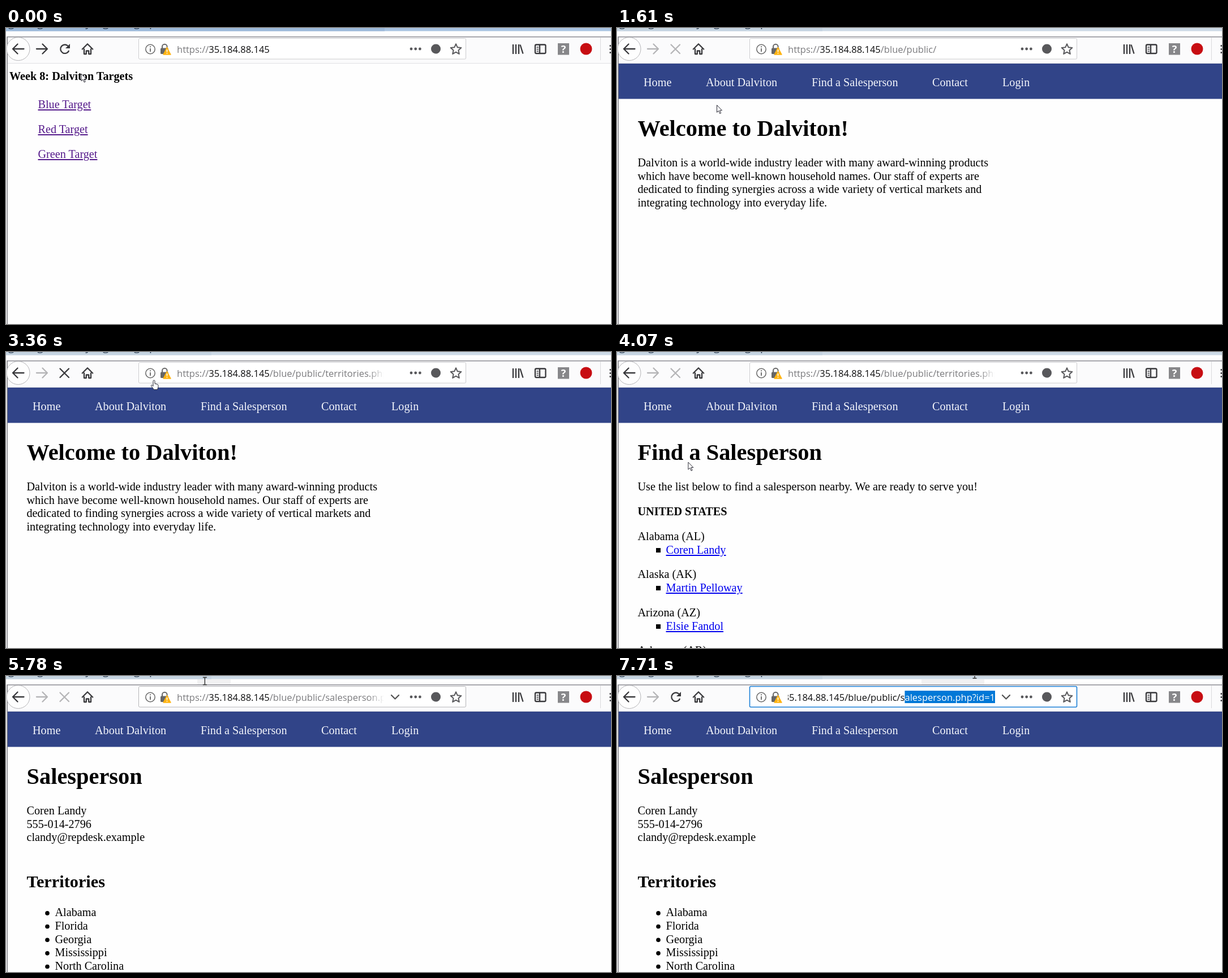
Recreate the animation shown at these times as an HTML page. Size 1069 px wide and 524 px high, loop 8000 ms.

```html
<!DOCTYPE html>
<html lang="en">
<head>
<meta charset="utf-8">
<title>Browser session</title>
<style>
  html, body { margin: 0; width: 100%; height: 100%; overflow: hidden; background: #fefefe; }
  svg { display: block; width: 1069px; height: 524px; }
  text { white-space: pre; }
  .page text { font: 20.2px "Liberation Serif", "Times New Roman", serif; }
  .page .b { font-weight: bold; }
  .page .h1 { font-size: 40.4px; font-weight: bold; }
  .page .h2 { font-size: 30.3px; font-weight: bold; }
  .page .nav { fill: #f3f5fb; }
  .page .link { fill: #0000ee; text-decoration: underline; text-decoration-skip-ink: none; }
  .page .seen { fill: #551a8b; }
  .url { font: 16.5px "Open Sans", "Noto Sans", sans-serif; }
  .line { fill: none; stroke: #39393c; stroke-width: 2.3; }
  .round { stroke-linecap: round; stroke-linejoin: round; }
  .dark { fill: #39393c; }
  .cursor path { fill: #fff; stroke: #2a2a35; stroke-width: 1; stroke-linejoin: round; }
  .cursor #beam path { fill: none; stroke: #333; stroke-width: 1.4; }
</style>
</head>
<body>
<svg viewBox="0 0 1069 524" width="1069" height="524">
  <defs>
    <clipPath id="field"><rect x="302" y="20" width="366" height="34"/></clipPath>
    <clipPath id="picked"><rect id="pickBox" x="302" y="26" width="366" height="22"/></clipPath>
    <linearGradient id="fade">
      <stop offset="0" stop-color="#fff" stop-opacity="0"/>
      <stop offset="1" stop-color="#fff"/>
    </linearGradient>
  </defs>
  <rect width="1069" height="524" fill="#fefefe"/>

  <!-- window behind -->
  <rect id="bar" width="1069" height="5.5"/>
  <rect id="barLeft" height="5.5"/>
  <text class="url" x="4" y="-2.5" fill="#26364a" style="font-size:19px">glazing mail, any log, hung up</text>
  <rect id="tab1" x="338" y="6" width="59" height="9" fill="#f1f1f2"/>
  <rect id="tab2" x="538" y="6" width="111" height="9" fill="#f1f1f2"/>

  <g id="pages"></g>

  <!-- toolbar -->
  <rect x="2" y="16" width="1067" height="46" fill="#fbfbfc"/>
  <rect x="2" y="62" width="1067" height="1" fill="#e1e1e4"/>
  <rect x="2" y="15" width="1067" height="1.4" fill="#85858c"/>
  <rect x="1.5" y="15" width="1.4" height="509" fill="#77777d"/>
  <circle cx="21.5" cy="37" r="20.5" fill="#fefefe" stroke="#b5b5b8"/>
  <path class="line round" d="M31.5 37H12M20.5 28.500L12 37l8.500 8.500"/>
  <path id="forward" class="line round" d="M54 37h18.500M64.500 28.500L73 37l-8.500 8.500"/>
  <g id="reload">
    <path class="line" d="M109.500 31.800A7.700 7.700 0 1 0 111.200 40"/>
    <path class="dark" d="M113 28v8h-8z"/>
  </g>
  <path id="stop" class="line round" d="M95.500 29.500l15.500 15.500M111 29.500L95.500 45"/>
  <path class="line round" d="M134.800 37.500l9.200-9.200 9.200 9.200M138 37.500V46h3.800v-5.500h4.400V46h3.800v-8.500"/>

  <rect id="box" x="234.500" y="18.500" width="578" height="36.500" rx="2" fill="#fff"/>
  <circle cx="255" cy="37.500" r="8.200" fill="none" stroke="#666" stroke-width="1.500"/>
  <path d="M255 36v6M255 32.300v2" stroke="#666" stroke-width="1.800"/>
  <path d="M276 36v-3a4.300 4.300 0 0 1 8.600 0v3" fill="none" stroke="#666" stroke-width="2"/>
  <rect x="273" y="35.500" width="14" height="10.500" rx="1.500" fill="#666"/>
  <path d="M284.500 34.500l6.500 12.500h-13z" fill="#ffb413" stroke="#ffb413" stroke-width="1.500" stroke-linejoin="round"/>
  <path d="M284.500 38v4.500M284.500 44v1.600" stroke="#fff" stroke-width="1.600"/>

  <g clip-path="url(#field)">
    <text id="idle" class="url" x="302" y="44" fill="#7a7a7d">https://<tspan fill="#0c0c0d">35.184.88.145</tspan><tspan id="path"></tspan></text>
    <rect id="veil" x="640" y="20" width="28" height="34" fill="url(#fade)"/>
    <text id="typed" class="url" y="44" fill="#0c0c0d"></text>
    <rect id="pick" y="26" height="22"/>
    <g clip-path="url(#picked)"><text id="typedOn" class="url" y="44" fill="#fff"></text></g>
  </g>
  <path id="chevron" class="line round" d="M681 34l6.500 6.500 6.500-6.500" style="stroke:#555"/>
  <g fill="#58585b"><circle cx="716" cy="37" r="2.400"/><circle cx="723.700" cy="37" r="2.400"/><circle cx="731.400" cy="37" r="2.400"/></g>
  <circle cx="759.500" cy="37" r="8.500" fill="#58585b"/>
  <path id="star" class="round" fill="none" stroke="#58585b" stroke-width="2"/>

  <path class="line" d="M896 29v17M901 29v17M906 29v17M908.500 29.500l5 16"/>
  <rect class="line" x="935" y="29.500" width="18.500" height="15.500" rx="2"/>
  <path class="line" d="M943 30v15"/>
  <path class="line" d="M937.500 34h3.500M937.500 37.500h3.500M937.500 41h3.500" style="stroke-width:1.500"/>
  <rect x="975" y="27" width="20" height="20.500" fill="#87878a"/>
  <text x="985" y="44" text-anchor="middle" fill="#fff" style="font:bold 18px 'Open Sans',sans-serif">?</text>
  <circle cx="1025" cy="37" r="10.500" fill="#c70d12"/>
  <rect x="1050" y="17" width="1" height="40" fill="#d9d9dc"/>
  <path class="line" d="M1066.500 31.500h3M1066.500 37.500h3M1066.500 43.500h3"/>

  <g id="cursor" class="cursor">
    <g id="arrow"><path d="M0 0v12.800l3-2.700 2.200 5 2-1-2.200-4.700h4z"/></g>
    <g id="hand"><path d="M-1.500 10.500V1.500a1.500 1.500 0 0 1 3 0V6l4 1q2 .5 2 2.500v2.500L6 16.500H0l-4.800-6q-1-1.800 1-2.200z"/></g>
    <g id="beam"><path d="M-3.500-6.500h7M-3.500 6.500h7M0-6.500v13"/></g>
  </g>
</svg>
<script>
const LOOP = 8000;
const $ = id => document.getElementById(id);
const show = (id, on) => { $(id).style.display = on ? '' : 'none'; };

// page contents; baselines sit on whole pixels
const LINE = 23.65;
const txt = (x, y, s, cls = '') => `<text x="${x}" y="${Math.round(y)}" class="${cls}">${s}</text>`;
const lines = (y, list) => list.map((s, i) => txt(36.5, y + i * LINE, s)).join('');
const nav = '<rect x="2" y="63" width="1067" height="62.5" fill="#314488"/>' +
  [[47, 'Home'], [157, 'About Dalviton'], [344, 'Find a Salesperson'], [557, 'Contact'], [681, 'Login']]
    .map(([x, s]) => txt(x, 103, s, 'nav')).join('');
const seller = ([state, name], i) => {
  const y = Math.round(333 + i * 67.4);
  return txt(36.5, y, state) + (name ?
    `<rect x="69" y="${y + 14}" width="8" height="8"/>` + txt(86.5, y + LINE, name, 'link') : '');
};
const bullet = (s, i) => {
  const y = 425.4 + i * LINE;
  return `<circle cx="73" cy="${y - 5.5}" r="3.8"/>` + txt(86.5, y, s);
};

const pages = {
  targets: txt(6, 92, 'Week 8: Dalviton Targets', 'b') +
    ['Blue', 'Red', 'Green'].map((c, i) => txt(56.5, 142 + i * 44, c + ' Target', 'link seen')).join(''),
  welcome: nav + txt(36.5, 191, 'Welcome to Dalviton!', 'h1') + lines(245, [
    'Dalviton is a world-wide industry leader with many award-winning products',
    'which have become well-known household names. Our staff of experts are',
    'dedicated to finding synergies across a wide variety of vertical markets and',
    'integrating technology into everyday life.']),
  list: nav + txt(36.5, 191, 'Find a Salesperson', 'h1') +
    txt(36.5, 245, 'Use the list below to find a salesperson nearby. We are ready to serve you!') +
    txt(36.5, 289, 'UNITED STATES', 'b') +
    [['Alabama (AL)', 'Coren Landy'], ['Alaska (AK)', 'Martin Pelloway'],
     ['Arizona (AZ)', 'Elsie Fandol'], ['Arkansas (AR)']].map(seller).join(''),
  person: nav + txt(36.5, 191, 'Salesperson', 'h1') +
    lines(245, ['Coren Landy', '555-014-2796', 'clandy@repdesk.example']) +
    txt(36.5, 374, 'Territories', 'h2') +
    ['Alabama', 'Florida', 'Georgia', 'Mississippi', 'North Carolina'].map(bullet).join('')
};
$('pages').innerHTML = Object.entries(pages)
  .map(([id, body]) => `<g id="${id}" class="page">${body}</g>`).join('');

$('star').setAttribute('d', 'M' + Array.from({ length: 10 }, (_, i) => {
  const a = i * Math.PI / 5 - Math.PI / 2, r = i % 2 ? 4.6 : 9.8;
  return (795 + r * Math.cos(a)).toFixed(1) + ' ' + (38 + r * Math.sin(a)).toFixed(1);
}).join('L') + 'z');

// value tables: [start time, value]
const at = (table, t) => table.reduce((v, [start, x]) => t >= start ? x : v, table[0][1]);
const pageAt = [[0, 'targets'], [1610, 'welcome'], [3480, 'list'], [5410, 'person']];
const pathAt = [[0, ''], [1360, '/blue/public/'], [3240, '/blue/public/territories.php'],
  [4930, '/blue/public/salesperson.php?id=1']];
const buttonAt = [[0, 'reload'], [1360, 'stop'], [1610, 'off'], [2200, 'reload'], [3240, 'stop'],
  [3480, 'off'], [4080, 'reload'], [4930, 'stop'], [5410, 'off'], [6140, 'reload']];
const shapeAt = [[0, 'arrow'], [1120, 'hand'], [1610, 'arrow'], [2200, 'hand'], [3480, 'arrow'],
  [4190, 'hand'], [4930, 'arrow'], [5530, 'beam']];

// pointer bursts: first step, last step, step count, way points
const moves = [
  [370, 370, 1, [[101, 82]]],
  [520, 640, 2, [[74.5, 83]]],
  [880, 1480, 6, [[88, 86], [122, 92], [134.5, 93]]],
  [1610, 1610, 1, [[176.5, 136.5]]],
  [1720, 2400, 7, [[200, 155], [240, 105], [261, 50]]],
  [2640, 3360, 7, [[258, 49], [261.5, 50]]],
  [3480, 4190, 7, [[205, 110], [130, 190], [101, 226]]],
  [4320, 4570, 3, [[104, 229]]],
  [4930, 5290, 4, [[170, 160], [298, 53.5]]],
  [5410, 5530, 2, [[356, 9]]],
  [5650, 5890, 3, [[349, 9]]],
  [6380, 6620, 3, [[380, 7.5]]],
  [7110, 7710, 6, [[470, 3], [632, -2.5]]]
];

function along(pts, k) {
  const p = k * (pts.length - 1), i = Math.min(Math.floor(p), pts.length - 2), f = p - i;
  return [0, 1].map(c => pts[i][c] + (pts[i + 1][c] - pts[i][c]) * f);
}

function pointer(t) {
  let pos = [133, 81];
  for (const [from, to, n, way] of moves) {
    if (t < from) break;
    const gap = n > 1 ? (to - from) / (n - 1) : 1;
    const step = Math.min(n, 1 + Math.floor((t - from) / gap + 1e-6));
    pos = along([pos, ...way], step / n);
  }
  return pos;
}

const FULL = 'https://35.184.88.145/blue/public/salesperson.php?id=1';
const ANCHOR = FULL.indexOf('alesperson');
$('typed').textContent = $('typedOn').textContent = FULL;
const spanTo = n => n ? $('typed').getSubStringLength(0, n) : 0;
// selected range by character
const rangeAt = [[0, [0, FULL.length]], [6870, [ANCHOR, ANCHOR]], [7110, [ANCHOR, ANCHOR + 4]],
  [7230, [ANCHOR, ANCHOR + 10]], [7350, [ANCHOR, FULL.length]]];

function drawField(t) {
  const focus = t >= 6140;
  $('path').textContent = at(pathAt, t);
  for (const id of ['typed', 'typedOn', 'pick']) show(id, focus);
  for (const id of ['idle', 'veil']) show(id, !focus);
  show('chevron', t >= 5650);
  $('box').setAttribute('stroke', focus ? '#1a7fd6' : t >= 5530 ? '#b4b4b7' : '#cccccf');
  $('box').setAttribute('stroke-width', focus ? 1.6 : 1);
  if (!focus) return;
  const x0 = t >= 7350 ? 668 - spanTo(FULL.length) : 302;
  const [a, b] = at(rangeAt, t);
  const left = x0 + spanTo(a), width = Math.max(1, spanTo(b) - spanTo(a));
  for (const id of ['typed', 'typedOn']) $(id).setAttribute('x', x0);
  for (const id of ['pick', 'pickBox']) {
    $(id).setAttribute('x', left);
    $(id).setAttribute('width', width);
  }
  $('pick').setAttribute('fill', a === b ? '#000' : '#0078d7');
}

function draw(t) {
  const page = at(pageAt, t), button = at(buttonAt, t), shape = at(shapeAt, t);
  const active = t < 1360;
  for (const id in pages) show(id, id === page);
  $('bar').setAttribute('fill', active ? '#a9c4e2' : '#cddae6');
  $('barLeft').setAttribute('fill', active ? '#9dbada' : '#c5d4e1');
  $('barLeft').setAttribute('width', active ? 669 : 363);
  $('forward').style.stroke = active ? '#39393c' : '#b5b5b7';
  show('reload', button === 'reload');
  show('stop', button !== 'reload');
  $('stop').style.stroke = button === 'off' ? '#b5b5b7' : '#39393c';
  show('tab1', t >= 5530 && t < 7110);
  show('tab2', t >= 7470);
  drawField(t);
  for (const id of ['arrow', 'hand', 'beam']) show(id, id === shape);
  $('cursor').setAttribute('transform', `translate(${pointer(t).join(' ')})`);
}

const start = performance.now();
function tick() {
  draw((performance.now() - start) % LOOP);
  requestAnimationFrame(tick);
}
tick();
</script>
</body>
</html>
```
